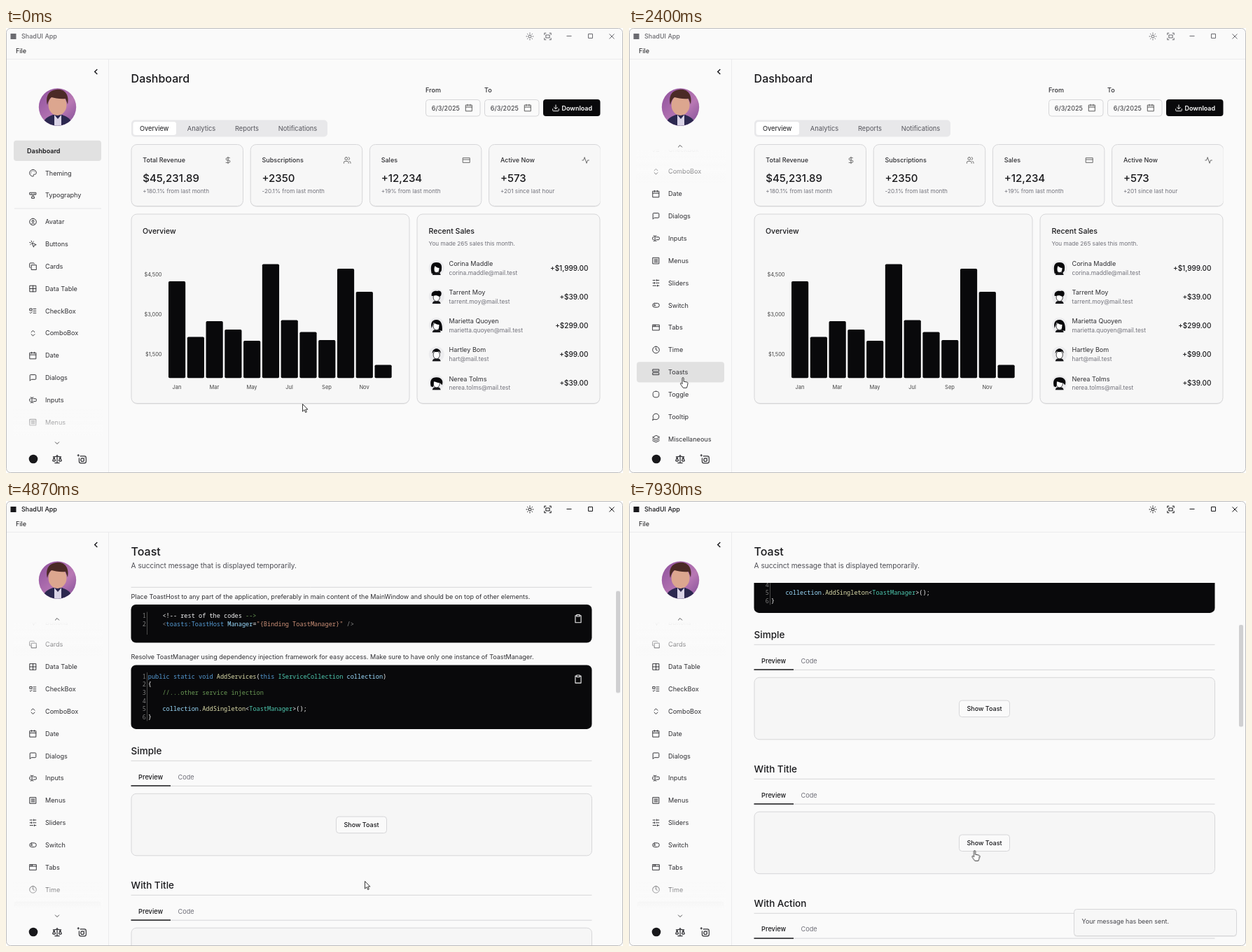
An HTML page for the animation above (8 s loop, 881 px wide and 636 px high).

```html
<!DOCTYPE html>
<html lang="en">
<head>
<meta charset="utf-8">
<title>ShadUI App</title>
<style>
  html, body { margin: 0; width: 100%; height: 100%; overflow: hidden; background: #fff; }
  svg { display: block; width: 881px; height: 636px; font-family: Inter, "Open Sans", sans-serif; }
  text { white-space: pre; }
  .code { font-family: "Noto Sans Mono", "DejaVu Sans Mono", monospace; font-size: 8.6px; font-weight: 500; }
  .icon { fill: none; stroke-width: 2; stroke-linecap: round; stroke-linejoin: round; }
</style>
</head>
<body>
<svg id="stage" viewBox="0 0 881 636"></svg>
<script>
const LOOP = 8000;
const INK = '#18181b', SOFT = '#2f2f33', MUTED = '#71717a', BG = '#fafafa', LINE = '#d6d6d8';

// ---- drawing helpers ----
const esc = s => s.replace(/&/g, '&amp;').replace(/</g, '&lt;').replace(/>/g, '&gt;');
const text = (x, y, s, size = 9.1, { w = 400, fill = SOFT, at = 'start' } = {}) =>
  `<text x="${x}" y="${y + size * 0.36}" font-size="${size}" font-weight="${w}" fill="${fill}" text-anchor="${at}">${esc(s)}</text>`;
const box = (x, y, w, h, r, fill, stroke = 'none', extra = '') =>
  `<rect x="${x}" y="${y}" width="${w}" height="${h}" rx="${r}" fill="${fill}" stroke="${stroke}" ${extra}/>`;
const icon = (x, y, d, size = 11.5, color = SOFT) =>
  `<path class="icon" stroke="${color}" transform="translate(${x - size / 2} ${y - size / 2}) scale(${size / 24})" d="${d}"/>`;
const hline = (x1, x2, y, color = LINE, w = 1) =>
  `<path d="M${x1} ${y}H${x2}" stroke="${color}" stroke-width="${w}"/>`;
const card = (x, y, w, h, r = 8) =>
  box(x, y + 1.2, w, h, r, '#00000014') + box(x, y, w, h, r, '#f7f7f7', LINE);
const ring = (x, y, r) => `M${x} ${y - r}a${r} ${r} 0 1 0 0 ${2 * r}a${r} ${r} 0 1 0 0 ${-2 * r}`;
const group = (id, body, extra = '') => `<g id="${id}" ${extra}>${body}</g>`;

const CALENDAR = 'M3 4h18v18H3z M8 2v4 M16 2v4 M3 10h18';
const CHEVRON = 'M5 15l7-7 7 7', CHEVRON_DOWN = 'M5 9l7 7 7-7';

// ---- title bar ----
const titleBar = group('titleBar',
  box(6.5, 8, 8, 8, 0, 'currentColor') +
  text(22, 11.5, 'ShadUI App', 9, { w: 500, fill: 'currentColor' }) +
  icon(748, 12, ring(12, 12, 4) + 'M12 2v2 M12 20v2 M4.9 4.9l1.4 1.4 M17.7 17.7l1.4 1.4 M2 12h2 M20 12h2 M6.3 17.7l-1.4 1.4 M19.1 4.9l-1.4 1.4', 12, 'currentColor') +
  icon(773.5, 12, 'M3 7V3h4 M17 3h4v4 M21 17v4h-4 M7 21H3v-4 M7 8h10v8H7z', 12.5, 'currentColor') +
  `<path d="M800.5 11.5h7M831.5 8.5h6v6h-6zM861.5 8.5l7 7m0-7l-7 7" fill="none" stroke="currentColor"/>`);

// ---- sidebar ----
const ITEMS = [
  ['Dashboard', ''],
  ['Theming', 'M12 2a10 10 0 1 0 0 20c2 0 2.5-1.5 1.7-3-.8-1.6.3-3 2-3H18c2.5 0 4-2 4-4.5C22 6 17.5 2 12 2z M8 8h.01 M12 6h.01 M16 8h.01 M6.5 12h.01'],
  ['Typography', 'M3 4h18v6h-4V8h-3v9h2v4H8v-4h2V8H7v2H3z'],
  ['Avatar', ring(12, 12, 10) + ring(12, 10, 3) + 'M6.5 19c1-4 10-4 11 0'],
  ['Buttons', 'M9 9l5 12 1.8-5.2L21 14z M7.2 2.2 8 5.1 M5.1 8l-2.9-.8 M14 4.1 12 6 M6 12l-1.9 2'],
  ['Cards', 'M8 8h14v14H8z M4 16c-1.1 0-2-.9-2-2V4c0-1.1.9-2 2-2h10c1.1 0 2 .9 2 2'],
  ['Data Table', 'M3 3h18v18H3z M3 12h18 M12 3v18'],
  ['CheckBox', 'M3 5h6v6H3z M3 17l2 2 4-4 M13 6h8 M13 12h8 M13 18h8'],
  ['ComboBox', 'M7 15l5 5 5-5 M7 9l5-5 5 5'],
  ['Date', CALENDAR],
  ['Dialogs', 'M21 15a2 2 0 0 1-2 2H7l-4 4V5a2 2 0 0 1 2-2h14a2 2 0 0 1 2 2z'],
  ['Inputs', 'M5 4h1a3 3 0 0 1 3 3 3 3 0 0 1 3-3h1 M13 20h-1a3 3 0 0 1-3-3 3 3 0 0 1-3 3H5 M5 16H4a2 2 0 0 1-2-2v-4a2 2 0 0 1 2-2h1 M13 8h7a2 2 0 0 1 2 2v4a2 2 0 0 1-2 2h-7 M9 7v10'],
  ['Menus', 'M3 3h18v18H3z M7 8h10 M7 12h10 M7 16h10'],
  ['Sliders', 'M21 4h-7 M10 4H3 M21 12h-9 M8 12H3 M21 20h-5 M12 20H3 M14 2v4 M8 10v4 M16 18v4'],
  ['Switch', 'M8 6h8a6 6 0 0 1 0 12H8A6 6 0 0 1 8 6z' + ring(8, 12, 2)],
  ['Tabs', 'M2 4h20v16H2z M2 9h20 M10 4v4 M6 4v4'],
  ['Time', ring(12, 12, 10) + 'M12 6v6l4 2'],
  ['Toasts', 'M3 4h18v6H3z M3 14h18v6H3z'],
  ['Toggle', 'M12 3c7 0 9 2 9 9s-2 9-9 9-9-2-9-9 2-9 9-9z'],
  ['Tooltip', 'M7.9 20A9 9 0 1 0 4 16.1L2 22z'],
  ['Miscellaneous', 'M12 2 2 7l10 5 10-5z M2 12l10 5 10-5 M2 17l10 5 10-5'],
];
const HOVERED = ['Date', 'Switch', 'Toasts'];
const itemBox = (y, extra) => box(11, y - 14.6, 125, 29.2, 4, '#e1e1e1', 'none', extra);

const item = ([name, d], i) => {
  const y = 175.4 + i * 31.84 + (i > 2 ? 6.1 : 0);
  if (!d) return itemBox(y, '') + text(30, y, name, 9, { w: 600, fill: INK });
  const hover = HOVERED.includes(name) ? itemBox(y, `id="hover${name}"`) : '';
  return hover + icon(38.5, y, d) + text(56, y, name);
};

const portrait = `<g clip-path="url(#face)">
  <rect x="46" y="86" width="55" height="55" fill="url(#purple)"/>
  <path d="M52 141c1-10 6-14 15-17h13c9 3 14 7 15 17z" fill="#2c2850"/>
  <path d="M69 124l5 6 5-6v17H69z" fill="#d9d3e6"/>
  <ellipse cx="73.5" cy="110" rx="13" ry="15" fill="#dca68f"/>
  <path d="M59 110c-3-14 3-21 13-22 11-2 19 7 16 21l-3-8c-8 1-15-1-20-2-3 2-5 6-6 11z" fill="#4b2a26"/></g>`;

const sidebar =
  `<g clip-path="url(#listClip)">${group('list', ITEMS.map(item).join('') + hline(12, 136, 258, '#e4e4e6'))}</g>` +
  group('topFade', box(10, 158, 128, 64, 0, 'url(#fadeTop)') + icon(73, 169, CHEVRON, 9, INK)) +
  group('endFade', box(10, 544, 128, 59, 0, 'url(#fadeEnd)') + icon(73, 593, CHEVRON_DOWN, 9, INK)) +
  `<path d="M146.5 45V635M1 44.5H880" stroke="#ebebed"/>` +
  text(14, 32.5, 'File', 9.1, { fill: INK }) +
  `<path d="M130.3 59l-3.6 3.5 3.6 3.5" fill="none" stroke="${INK}" stroke-width="1.4"/>` + portrait +
  `<circle cx="39" cy="616" r="6.3" fill="${INK}"/>` +
  icon(73, 616, 'M12 3v18 M7 21h10 M3 7h2c2 0 5-1 7-2 2 1 5 2 7 2h2 M16 16l3-8 3 8c-1.7 1.3-4.3 1.3-6 0z M2 16l3-8 3 8c-1.7 1.3-4.3 1.3-6 0z', 15) +
  icon(108.5, 616, 'M8 5h10a4 4 0 0 1 4 4v9a4 4 0 0 1-4 4H9a4 4 0 0 1-4-4v-8 M18 9h.01 M1 3h4 M3 1v4' + ring(13, 14, 4), 14);

// ---- dashboard page ----
const dateField = (x, label) =>
  text(x, 89, label, 9.1, { w: 500 }) + box(x + .5, 102.5, 77.5, 23.5, 4, BG, LINE) +
  text(x + 8.8, 114.3, '6/3/2025', 9.1) + icon(x + 62, 114, CALENDAR, 11.5, '#555');

const STATS = [
  ['Total Revenue', '$45,231.89', '+180.1% from last month', 'M12 2v20 M17 5H9.5a3.5 3.5 0 0 0 0 7h5a3.5 3.5 0 0 1 0 7H6'],
  ['Subscriptions', '+2350', '-20.1% from last month', 'M16 21v-2a4 4 0 0 0-4-4H6a4 4 0 0 0-4 4v2 M22 21v-2a4 4 0 0 0-3-3.9 M16 3.1a4 4 0 0 1 0 7.8' + ring(9, 7, 4)],
  ['Sales', '+12,234', '+19% from last month', 'M2 5h20v14H2z M2 10h20'],
  ['Active Now', '+573', '+201 since last hour', 'M22 12h-4l-3 9L9 3l-3 9H2'],
];
const stat = ([label, value, note, d], i) => {
  const x = 179 + i * 170.2;
  return card(x, 166.5, 159.5, 88) + text(x + 16.3, 189, label, 9, { w: 500 }) +
    text(x + 16.3, 215, value, 15, { w: 500, fill: INK }) +
    text(x + 16.3, 232.8, note, 8.2, { fill: MUTED }) + icon(x + 138, 189, d, 11.5, '#666');
};

const BAR_TOPS = [362, 441.5, 419, 431, 447, 337.5, 417.5, 434.5, 446, 344, 377, 481.5];
const chart = card(179, 266, 397, 270.5) + text(195, 290, 'Overview', 10.5, { w: 500, fill: INK }) +
  ['$4,500', '$3,000', '$1,500'].map((s, i) => text(222.5, 352.3 + i * 57.1, s, 7.4, { at: 'end', fill: '#444' })).join('') +
  BAR_TOPS.map((y, i) => box(232 + i * 26.77, y, 24.2, 500.3 - y, 1.8, '#09090b')).join('') +
  ['Jan', 'Mar', 'May', 'Jul', 'Sep', 'Nov'].map((s, i) => text(244 + i * 53.5, 513.5, s, 7.5, { at: 'middle', fill: '#444' })).join('');

const SALES = [
  ['Corina Maddle', 'corina.maddle', '+$1,999.00'],
  ['Tarrent Moy', 'tarrent.moy', '+$39.00'],
  ['Marietta Quoyen', 'marietta.quoyen', '+$299.00'],
  ['Hartley Bom', 'hart', '+$99.00'],
  ['Nerea Tolms', 'nerea.tolms', '+$39.00'],
];
const HAIR = [
  'M-7 8c-2-10-1-16 7-16s8 6 7 12l-4 5 1-9c-3 0-5-2-6-3-2 3-1 8 0 11z',
  'M-7-1c-1-6 4-8 8-7 4-2 8 2 5 7l-2 1c-3-2-6-2-9-1z',
  'M-7 4c-2-8 1-12 7-12s9 6 8 16l-5-1 1-8c-4 0-6-2-8-3z',
  'M-6-1c0-5 3-7 6-7s6 2 6 7l-2-3c-3 1-6 1-8 0z',
  'M-8 5c-2-9 1-13 8-13 8 0 10 6 8 11l-3-3c-4 0-7-2-9-2 0 4 0 6-1 8z',
];
const sale = ([name, user, amount], i) => {
  const y = 342.9 + i * 41.1;
  return `<g transform="translate(614.7 ${y})"><circle r="11" fill="#ececee"/>
    <path d="M-6 10c1-4 3-4 6-4s5 0 6 4z" fill="${INK}"/>
    <ellipse cy="1" rx="4.6" ry="5.6" fill="#fff" stroke="${INK}" stroke-width=".8"/>
    <path d="${HAIR[i]}" fill="#09090b"/></g>` +
    text(632.5, y - 6, name, 9.1) + text(632.5, y + 6.7, user + '@mail.test', 8.4, { fill: MUTED }) +
    text(831.5, y, amount, 10, { w: 500, at: 'end', fill: INK });
};

const tabNames = [['Overview', 211.7], ['Analytics', 279], ['Reports', 344], ['Notifications', 416.5]];
const dashboard = group('dashboard',
  text(178.6, 72, 'Dashboard', 16, { w: 500, fill: INK }) +
  dateField(599, 'From') + dateField(683, 'To') +
  box(767, 102, 81.5, 24, 4, '#09090b') +
  icon(785, 114.3, 'M21 15v4a2 2 0 0 1-2 2H5a2 2 0 0 1-2-2v-4 M7 10l5 5 5-5 M12 15V3', 11.5, '#fff') +
  text(793.5, 114.3, 'Download', 9, { w: 600, fill: '#fff' }) +
  box(179, 131.5, 280, 24, 5, '#e8e8ea') + box(181.5, 134, 61.5, 19, 3.5, '#fff') +
  tabNames.map(([s, x], i) => text(x, 143.6, s, 9.3, { at: 'middle', fill: i ? '#55555c' : INK })).join('') +
  `<g clip-path="url(#statClip)">${STATS.map(stat).join('')}</g>` + chart +
  card(587, 266, 261, 270.5) + text(603.5, 290, 'Recent Sales', 10.6, { w: 500, fill: INK }) +
  text(603.5, 308.5, 'You made 265 sales this month.', 8.2, { fill: MUTED }) +
  SALES.map(sale).join(''));

// ---- toast page ----
const C = { plain: '#f4f4f5', key: '#569cd6', fn: '#dcdcaa', type: '#4ec9b0', name: '#9cdcfe', str: '#ce9178', note: '#6a9955', dim: '#8a8a8a' };
const codeLine = (y, parts, tinted = true) =>
  `<text class="code" x="202.8" y="${y + 3}">` +
  parts.map(([c, s]) => `<tspan fill="${tinted ? C[c] : C.plain}">${esc(s)}</tspan>`).join('') + '</text>';
const gutter = (y, n) => Array.from({ length: n }, (_, i) =>
  `<text class="code" x="200" y="${y + 3 + i * 11.65}" text-anchor="end" fill="#7d7d7d">${i + 1}</text>`).join('');
const codeBox = (y, h, n) =>
  box(178.5, y, 658, h, 7, '#09090b') + gutter(y + 16.4, n) +
  `<path d="M201.5 ${y + 10.5}V${y + h - 11.5}" stroke="#4a4a4a"/>` +
  icon(817, y + 20.3, 'M8 3.5H4.5v18.5h15V3.5H16 M8 1.5h8v4.5H8z', 13, '#f4f4f5');

const SERVICE = [
  [['key', 'public static void '], ['fn', 'AddServices'], ['plain', '('], ['key', 'this '], ['type', 'IServiceCollection '], ['name', 'collection'], ['plain', ')']],
  [['plain', '{']],
  [['note', '    //...other service injection']],
  [],
  [['name', '    collection'], ['plain', '.'], ['fn', 'AddSingleton'], ['plain', '<'], ['type', 'ToastManager'], ['plain', '>();']],
  [['plain', '}']],
];
const service = tinted => SERVICE.map((parts, i) => codeLine(284 + i * 11.65, parts, tinted)).join('');

const heading = (y, s) => text(178.6, y, s, 13.5, { w: 500, fill: INK }) + hline(178.5, 836.5, Math.floor(y + 14) + .5);
const section = (s, i) => {
  const y = 390.5 + i * 191.9;
  return heading(y, s) + text(206.6, y + 37, 'Preview', 9.2, { w: 500, at: 'middle', fill: INK }) +
    text(245.5, y + 37, 'Code', 9.2, { fill: MUTED }) +
    hline(178.5, 836.5, y + 50) + hline(178.5, 235, y + 49.8, INK, 1.5) +
    box(179, y + 61, 657.5, 88.5, 7, '#f6f6f6', LINE) +
    box(471.5, y + 93.8, 72, 23.5, 4, BG, LINE) +
    text(507.5, y + 105.6, 'Show Toast', 9, { w: 500, at: 'middle', fill: INK });
};

const toastPage = group('toastPage',
  text(178.6, 72, 'Toast', 16, { w: 500, fill: INK }) +
  text(178.6, 92, 'A succinct message that is displayed temporarily.', 10.15, { fill: '#4b4b52' }) +
  `<g clip-path="url(#pageClip)">` + group('page',
    heading(142.5, 'Installation') +
    text(178.5, 169.5, 'Place ToastHost to any part of the application, preferably in main content of the MainWindow and should be on top of other elements.', 9.05) +
    codeBox(181.2, 54.5, 2) +
    codeLine(197.6, [['plain', '    <!-- rest of the codes '], ['note', '-->']]) +
    codeLine(209.4, [['dim', '    <'], ['key', 'toasts:ToastHost '], ['name', 'Manager'], ['plain', '='], ['str', '"{Binding ToastManager}"'], ['dim', ' />']]) +
    text(178.5, 255.8, 'Resolve ToastManager using dependency injection framework for easy access. Make sure to have only one instance of ToastManager.', 9.05) +
    codeBox(267.6, 91.5, 6) + group('codePlain', service(false)) + group('codeTinted', service(true)) +
    ['Simple', 'With Title', 'With Action'].map(section).join('')) + '</g>' +
  group('thumb', box(871, 119, 6, 145.5, 2, '#cfcfd1', 'none', 'id="thumbBar"')));

const toast = group('toast', card(635.5, 583.5, 232, 38, 4) +
  text(646.5, 601, 'Your message has been sent.', 8.95, { fill: '#44444a' }));

// ---- pointer ----
const pointer = group('pointer',
  `<path id="arrow" d="M.5 .5v10.6l2.5-2.4 1.7 3.8 1.6-.7-1.6-3.7h3.2z" fill="#fff" stroke="#222" stroke-width=".9"/>` +
  `<path id="hand" transform="translate(-4 0)" d="M3 1.7c0-1.6 2.1-1.6 2.1 0v4.5l4.6 .9c1 .2 1.4 .8 1.3 1.8l-.6 3.4-1.1 3H4.4L1.4 11.3.5 9.4c-.3-1 .8-1.4 1.5-.7l1 1z" fill="#fff" stroke="#222" stroke-width=".9"/>`,
  'stroke-linejoin="round"');

const clip = (id, x, y, w, h) => `<clipPath id="${id}"><rect x="${x}" y="${y}" width="${w}" height="${h}"/></clipPath>`;
const fade = (id, y1, y2, stops) =>
  `<linearGradient id="${id}" gradientUnits="userSpaceOnUse" x1="0" x2="0" y1="${y1}" y2="${y2}">` +
  stops.map(([y, a]) => `<stop offset="${(y - y1) / (y2 - y1)}" stop-color="${BG}" stop-opacity="${a}"/>`).join('') + '</linearGradient>';

document.getElementById('stage').innerHTML = '<defs>' +
  clip('listClip', 10, 159, 128, 443.5) + clip('statClip', 170, 160, 678.5, 100) + clip('pageClip', 148, 117, 732, 518) +
  `<clipPath id="face"><circle cx="73.5" cy="113" r="26.7"/></clipPath>
   <linearGradient id="purple" x1="0" y1="0" x2="1" y2="1"><stop stop-color="#8d4f9c"/><stop offset=".6" stop-color="#b878b4"/><stop offset="1" stop-color="#7d4a94"/></linearGradient>` +
  fade('fadeTop', 158, 222, [[173, 1], [179, .9], [205, .5], [214, .12], [222, 0]]) +
  fade('fadeEnd', 544, 603, [[544, 0], [555, .45], [564, .6], [576, .9], [583, 1]]) + '</defs>' +
  box(.5, .5, 880, 635, 6, BG) + dashboard + toastPage + sidebar + titleBar + toast +
  box(.5, .5, 880, 635, 6, 'none', '#bcbcbe') + pointer;

// ---- motion: rows of [ms, value] ----
const play = (id, prop, rows, easing = 'linear') => {
  const all = [...rows, [LOOP, rows[rows.length - 1][1]]];
  if (all[0][0] > 0) all.unshift([0, all[0][1]]);
  document.getElementById(id).animate(
    all.map(([t, v]) => ({ offset: t / LOOP, [prop]: v, easing })),
    { duration: LOOP, iterations: Infinity });
};
const step = (id, prop, rows) => play(id, prop, rows, 'step-end');
const moveY = (id, rows, k = -1, easing) =>
  play(id, 'transform', rows.map(([t, v]) => [t, `translate(0px, ${v * k}px)`]), easing);

const PATH = [
  [0, 423, 537], [70, 423, 537], [270, 270, 512], [470, 92, 472], [600, 81, 476], [800, 81, 478],
  [1700, 81, 478], [2050, 77, 499], [3200, 77, 499], [3530, 327, 567], [4070, 327, 567],
  [4330, 430, 520], [4600, 512, 543], [5100, 512, 543], [5600, 497, 402], [6330, 495, 402],
  [6600, 490, 474], [7400, 490, 474], [7600, 456, 507], [7730, 470, 508], [7930, 493.5, 499],
];
play('pointer', 'transform', PATH.map(([t, x, y]) => [t, `translate(${x}px, ${y}px)`]));
const SHAPES = [[0, 0], [430, 1], [3270, 0], [5580, 1], [6390, 0], [7860, 1]];
step('hand', 'opacity', SHAPES);
step('arrow', 'opacity', SHAPES.map(([t, v]) => [t, 1 - v]));

moveY('list', [[0, 0], [530, 0], [700, 33], [870, 60.5], [1130, 66.4], [1330, 66.4], [1700, 165], [2070, 231], [2470, 231], [2800, 135.6]]);
play('topFade', 'opacity', [[0, 0], [530, 0], [680, 1]]);
play('endFade', 'opacity', [[0, 1], [1930, 1], [2070, 0], [2470, 0], [2600, 1]]);
play('hoverDate', 'opacity', [[0, 0], [430, 0], [560, 1], [670, 1], [870, .3], [1000, 0]]);
play('hoverToasts', 'opacity', [[0, 0], [1950, 0], [2150, 1]]);
play('hoverSwitch', 'opacity', [[0, 0], [2600, 0], [2900, 1], [3270, 1], [3600, 0]]);

step('titleBar', 'color', [[0, '#6b6b70'], [2470, INK]]);
play('dashboard', 'opacity', [[0, 1], [2430, 1], [2730, 0]]);
play('toastPage', 'opacity', [[0, 0], [2630, 0], [3130, .92], [3330, 1]]);
step('codePlain', 'opacity', [[0, 1], [3870, 0]]);
step('codeTinted', 'opacity', [[0, 0], [3870, 1]]);

const NOTCH = 33.2;
const SCROLL = [[0, 0], [4870, 1], [4930, 2], [5000, 3], [6930, 4], [7000, 5], [7070, 6]].map(([t, n]) => [t, n * NOTCH]);
moveY('page', SCROLL, -1, 'step-end');
moveY('thumb', SCROLL, .2915, 'step-end');
play('thumbBar', 'x', [[0, '873px'], [3330, '873px'], [3530, '871px']]);
play('thumbBar', 'width', [[0, '3px'], [3330, '3px'], [3530, '6px']]);
play('toast', 'opacity', [[0, 0], [5730, 0], [6200, 1]]);
</script>
</body>
</html>
```
